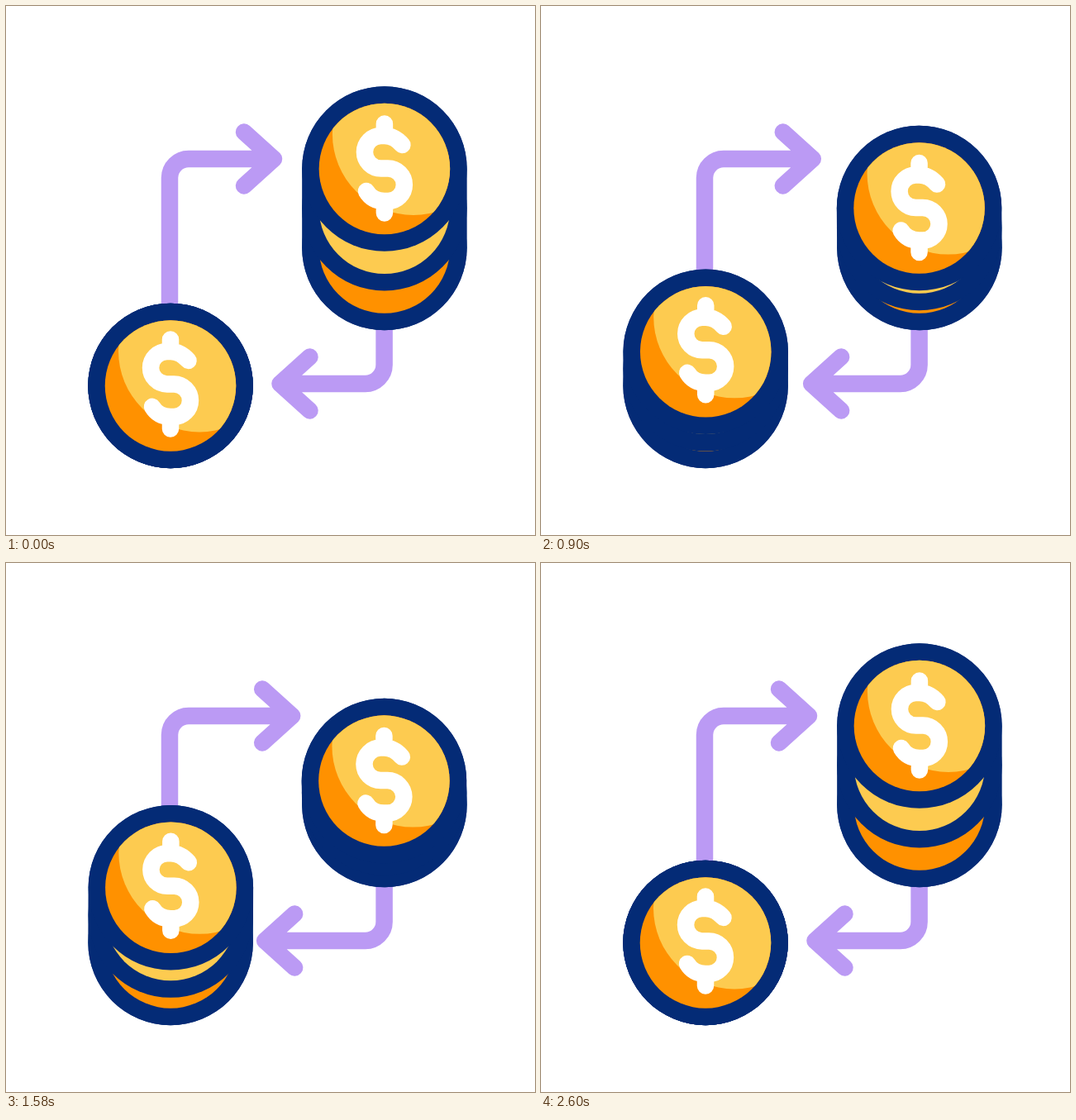
These frames come from a looping animation (640 px wide and 640 px high, 2820 ms). An HTML page with a canvas:

```html
<!DOCTYPE html>
<html lang="en">
<head>
<meta charset="utf-8">
<title>Coin exchange</title>
<style>
html, body { margin: 0; width: 100%; height: 100%; overflow: hidden; background: #fff; }
canvas { display: block; width: 640px; height: 640px; }
</style>
</head>
<body>
<canvas width="640" height="640"></canvas>
<script>
const LOOP = 2820;
const NAVY = '#042b76', YELLOW = '#fdcb50', ORANGE = '#ff9100', PURPLE = '#bb9af4';
const RADIUS = 89.5, RIM = 20.5, GROWTH = 95.5;

const canvas = document.querySelector('canvas');
const ctx = canvas.getContext('2d');
const scale = Math.max(1, window.devicePixelRatio || 1);
canvas.width = canvas.height = 640 * scale;

const dollar = new Path2D(
  'M21.5-28.5C15-36 8-39.5 0-39.5H-4.2A19.75 19.75 0 0 0-4.2 0H4.2' +
  'A19.75 19.75 0 0 1 4.2 39.5H0C-9 39.5-17 36-22 27.5M0-54V-39.5M0 39.5V54');

const smooth = u => u * u * (3 - 2 * u);

// Smoothstep with a shorter ease-in: cubic-bezier(.2, 0, .667, 1)
function quickStart(x) {
  let lo = 0, hi = 1;
  for (let i = 0; i < 20; i++) {
    const m = (lo + hi) / 2, n = 1 - m;
    if (0.6 * n * n * m + 2 * n * m * m + m ** 3 < x) lo = m; else hi = m;
  }
  return smooth(lo);
}

// Up and down twice, 600 ms each way, then rest
function stackPhase(t, fall) {
  if (t >= 2400) return 0;
  const u = t % 1200 / 600;
  return u < 1 ? smooth(u) : 1 - fall(u - 1);
}

// Arrow reach: swings between high and low every 300 ms, starting and ending at 0
function reach(t, high, low) {
  if (t < 400) return high * smooth(t / 400);
  if (t >= 2200) return high * (1 - smooth((t - 2200) / 400));
  const u = (t - 400) % 600 / 300;
  return high + (low - high) * smooth(u < 1 ? u : 2 - u);
}

function disc(x, y, r, fill) {
  ctx.beginPath();
  ctx.arc(x, y, r, 0, 2 * Math.PI);
  ctx.fillStyle = fill;
  ctx.fill();
}

function coin(x, y, fill) {
  disc(x, y, RADIUS + RIM / 2, NAVY);
  disc(x, y, RADIUS - RIM / 2, fill);
}

function faceCoin(x, y, signShift) {
  coin(x, y, ORANGE);
  ctx.save();
  ctx.beginPath();
  ctx.arc(x, y, RADIUS - RIM / 2, 0, 2 * Math.PI);
  ctx.clip();
  disc(x + 35, y - 42, 98, YELLOW);
  ctx.restore();
  ctx.save();
  ctx.translate(x, y + signShift);
  ctx.strokeStyle = '#fff';
  ctx.lineWidth = 20.5;
  ctx.stroke(dollar);
  ctx.restore();
}

function stack(topX, topY, baseX, baseY, signShift) {
  ctx.beginPath();
  ctx.moveTo(topX, topY);
  ctx.lineTo(baseX, baseY + 0.01);
  ctx.strokeStyle = NAVY;
  ctx.lineWidth = 2 * RADIUS + RIM;
  ctx.stroke();
  coin(baseX, baseY, ORANGE);
  coin((topX + baseX) / 2, (topY + baseY) / 2, YELLOW);
  faceCoin(topX, topY, signShift);
}

function arrow(x, startY, y, tip, dir) {
  ctx.beginPath();
  ctx.moveTo(x, startY);
  ctx.arcTo(x, y, tip, y, 23);
  ctx.lineTo(tip, y);
  ctx.moveTo(tip - 36 * dir, y - 32.5);
  ctx.lineTo(tip, y);
  ctx.lineTo(tip - 36 * dir, y + 32.5);
  ctx.strokeStyle = PURPLE;
  ctx.lineWidth = 20.5;
  ctx.stroke();
}

function draw(t) {
  ctx.setTransform(scale, 0, 0, scale, 0, 0);
  ctx.fillStyle = '#fff';
  ctx.fillRect(0, 0, 640, 640);
  ctx.lineCap = ctx.lineJoin = 'round';

  arrow(198, 459, 185, 324 + reach(t, 23, -48.5), 1);
  arrow(457.6, 293, 457, 331.5 + reach(t, -19, 38.5), -1);

  const left = stackPhase(t, quickStart), right = stackPhase(t, smooth);
  stack(199 + 0.5 * left, 459.4 - GROWTH * left, 199.1, 459.4, -2);
  stack(457.9 - 0.7 * right, 197 + GROWTH * right, 457.9, 292.5, -0.5);
}

function tick() {
  draw(Math.min(performance.now() % LOOP, 2600));
  requestAnimationFrame(tick);
}
tick();
</script>
</body>
</html>
```
